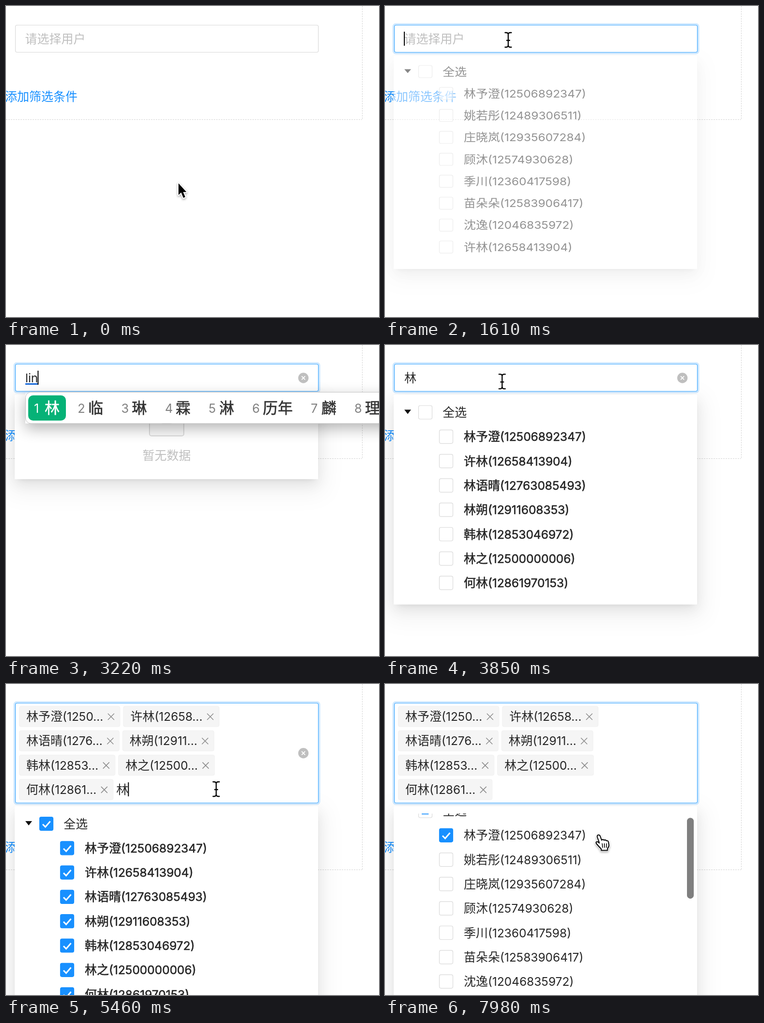
Recreate the animation shown at these times as an HTML page with a canvas. Size 772 px wide and 642 px high, loop 8 s.

```html
<!DOCTYPE html>
<html lang="zh-CN">
<head>
<meta charset="utf-8">
<title>用户筛选</title>
<style>
html, body { margin: 0; width: 100%; height: 100%; overflow: hidden; background: #fff; }
canvas { display: block; width: 772px; height: 642px; }
</style>
</head>
<body>
<canvas id="stage" width="772" height="642"></canvas>
<script>
const ctx = document.getElementById('stage').getContext('2d');
const LOOP = 8000, STEP = 70;
const BLUE = '#1890ff', INK = '#262626', LINE = '#d9d9d9', PALE = '#bfbfbf';
const LEFT = 19, WIDTH = 628, TOP = 39, ROW = 50.3;

const all = [
  '林予澄(12506892347)', '姚若彤(12489306511)', '庄晓岚(12935607284)',
  '顾沐(12574930628)', '季川(12360417598)', '苗朵朵(12583906417)',
  '沈逸(12046835972)', '许林(12658413904)', '韩林(12853046972)'
];
const found = [
  all[0], all[7], '林语晴(12763085493)', '林朔(12911608353)',
  all[8], '林之(12500000006)', '何林(12861970153)'
];
const candidates = {
  l: ['了', '来', '里', '老', '两', '路', '啦', '类'],
  li: ['里', '力', '离', '利', '理', '立', '例', '丽'],
  lin: ['林', '临', '琳', '霖', '淋', '历年', '麟', '理']
};
const caretTimes = [[1120, 1960], [2450, 3850], [4340, 4830], [5320, 5880], [6440, 7420]];
const mouseKeys = [
  [0, 357, 366], [420, 262, 18], [630, 250, 52], [840, 250, 52], [980, 255, 70],
  [3710, 255, 70], [4550, 85, 143], [4900, 85, 143], [5390, 435, 217],
  [5950, 435, 217], [6090, 425, 217], [6860, 425, 217], [7560, 445, 314]
];

const clamp = v => Math.max(0, Math.min(1, v));
const ramp = (t, a, b) => clamp((t - a) / (b - a));
const within = (t, a, b) => t >= a && t < b;

function mouseAt(t) {
  const i = mouseKeys.findIndex(k => k[0] > t);
  if (i < 0) return mouseKeys.at(-1).slice(1);
  const [t0, x0, y0] = mouseKeys[i - 1], [t1, x1, y1] = mouseKeys[i];
  const p = ramp(t, t0, t1), e = p * p * (3 - 2 * p);
  return [x0 + (x1 - x0) * e, y0 + (y1 - y0) * e];
}

// Draws mixed text on its vertical centre and returns its right end.
function text(s, x, mid, color = INK, { size = 25, bold = false, draw = true } = {}) {
  ctx.fillStyle = ctx.strokeStyle = color;
  ctx.lineWidth = 0.6;
  for (const run of s.match(/[ -~]+|[^ -~]+/g) || []) {
    const latin = run < '\x7f';
    ctx.font = latin ? `${size * 0.98}px Inter, sans-serif`
                     : `${size}px "Noto Sans CJK SC", "Noto Sans CJK", sans-serif`;
    if (draw) {
      ctx.fillText(run, x, mid + size * 0.36);
      if (bold) ctx.strokeText(run, x, mid + size * 0.36);
    }
    x += ctx.measureText(run).width;
  }
  return x;
}

function box(x, y, w, h, r, fill, stroke, lineWidth = 1.2) {
  ctx.beginPath();
  ctx.roundRect(x, y, w, h, r);
  if (fill) { ctx.fillStyle = fill; ctx.fill(); }
  if (stroke) { ctx.strokeStyle = stroke; ctx.lineWidth = lineWidth; ctx.stroke(); }
}

// Casts only the shadow around the box; the box itself stays off stage.
function shadow(x, y, w, h, dy, blur, spread, alpha) {
  ctx.save();
  ctx.beginPath();
  ctx.rect(-100, -100, 1000, 1000);
  ctx.rect(x, y, w, h);
  ctx.clip('evenodd');
  ctx.shadowColor = `rgba(0,0,0,${alpha})`;
  ctx.shadowBlur = blur;
  ctx.shadowOffsetX = 2000;
  ctx.shadowOffsetY = dy;
  box(x - 2000 - spread, y - spread, w + 2 * spread, h + 2 * spread, 4, '#000');
  ctx.restore();
}

function lines(color, width, ...paths) {
  ctx.strokeStyle = color;
  ctx.lineWidth = width;
  ctx.beginPath();
  for (const [x, y, ...rest] of paths) {
    ctx.moveTo(x, y);
    for (let i = 0; i < rest.length; i += 2) ctx.lineTo(rest[i], rest[i + 1]);
  }
  ctx.stroke();
}

const cross = (x, y, r, color, w) =>
  lines(color, w, [x - r, y - r, x + r, y + r], [x - r, y + r, x + r, y - r]);

function page(bottom) {
  const edge = Math.floor(bottom + 138) + .5;
  ctx.setLineDash([3, 2]);
  lines('#d4d4d4', 1, [737.5, 0, 737.5, edge], [0, edge, 737, edge]);
  ctx.setLineDash([]);
  text('添加筛选条件', -2, bottom + 91, BLUE);
}

function checkbox(x, mid, state, hover) {
  const on = state === 'on', y = mid - 14;
  box(x + .5, y, 28, 28, 3.5, on ? BLUE : '#fff', on || hover ? BLUE : LINE);
  if (on) lines('#fff', 3, [x + 7, mid + 1, x + 12.5, mid + 6.5, x + 22.5, mid - 5]);
  if (state === 'some') box(x + 7, mid - 7, 14.3, 14.3, 0, BLUE);
}

function list(t, top, rows, height) {
  const searching = rows === found, ticked = t >= 4760;
  const scroll = t >= 7980 ? 26.5 : 20 * ramp(t, 7560, 7770);
  ctx.save();
  ctx.beginPath();
  ctx.rect(18, top, WIDTH, height);
  ctx.clip();
  let mid = top + 21 - scroll;
  ctx.fillStyle = '#111';
  ctx.beginPath();
  ctx.moveTo(40, mid - 5.5);
  ctx.lineTo(54, mid - 5.5);
  ctx.lineTo(47, mid + 3.5);
  ctx.fill();
  checkbox(69, mid, ticked ? (searching ? 'on' : 'some') : '', within(t, 4620, 4760));
  text('全选', 119.3, mid);
  for (const name of rows) {
    mid += ROW;
    checkbox(112, mid, ticked && found.includes(name) ? 'on' : '');
    text(name, 163, mid, INK, { bold: searching });
  }
  ctx.restore();
  if (t >= 7630) box(625, top - 1 + scroll * 0.365, 14, 167, 7, '#7f7f7f');
}

function emptyNote() {
  box(297, 148, 71, 39.5, 4, '#fafafa', LINE, 1.8);
  lines(LINE, 1.8, [297, 150, 312, 122, 353, 122, 368, 150]);
  box(319, 148, 27, 14, 6, '#fff', LINE, 1.8);
  text('暂无数据', 282.5, 228, PALE);
}

function dropdown(t, bottom, typed) {
  const open = ramp(t, 1470, 1750);
  if (!open) return;
  const rows = within(t, 3290, 6790) ? found : all;
  const listHeight = Math.min(458.5, (rows.length + 1) * ROW);
  const y = bottom + 7, h = typed ? 174 : listHeight + 30;
  ctx.save();
  ctx.globalAlpha = open;
  ctx.translate(0, y);
  ctx.scale(1, 0.8 + 0.2 * open);
  ctx.translate(0, -y);
  shadow(18, y, WIDTH, h, 16, 50, 14, .05);
  shadow(18, y, WIDTH, h, 10.7, 28, 0, .08);
  shadow(18, y, WIDTH, h, 5.4, 10.7, -7, .12);
  box(18, y, WIDTH, h, 3.5, '#fff');
  if (typed) emptyNote();
  else list(t, y + 15, rows, listHeight);
  ctx.restore();
}

// Lays out the chosen users and returns where typing continues.
function tags() {
  let x = 27, mid = 67;
  found.forEach((name, i) => {
    if (i && i % 2 === 0) { x = 27; mid += ROW; }
    const label = name.slice(0, 8) + '...';
    const end = text(label, x + 15, mid, INK, { draw: false });
    box(x + .5, mid - 21, end + 34 - x, 42, 3.5, '#f5f5f5', '#f0f0f0', 1);
    text(label, x + 15, mid);
    cross(end + 16, mid + .5, 6.5, '#8c8c8c', 1.5);
    x = end + 41;
  });
  return [x, mid];
}

function field(t, bottom, typed, hover) {
  const focus = ramp(t, 1050, 1260), h = Math.round(bottom) - TOP;
  if (focus) box(LEFT - 1.5, TOP - 1.5, WIDTH + 3, h + 3, 5, null, `rgba(24,144,255,${.2 * focus})`, 4);
  box(LEFT + .5, TOP + .5, WIDTH - 1, h - 1, 3.5, '#fff', hover || focus ? '#40a9ff' : LINE);

  const chosen = t >= 4830;
  const [x, mid] = chosen ? tags() : [40, 68];
  const value = typed || (within(t, 3290, 6790) ? '林' : '');
  if (!value && !chosen) text('请选择用户', 39.5, 67.5, PALE);
  const end = text(value, x, mid);
  if (typed) box(x, 79, end - x, 3, 0, '#1668d9');
  if (caretTimes.some(([a, b]) => within(t, a, b))) box(end - 1, mid - 15, 2, 29, 0, '#000');

  if (hover && (value || chosen)) {
    const cy = (TOP + bottom) / 2 + .5;
    box(604.8, cy - 10.7, 21.4, 21.4, 11, PALE);
    cross(615.5, cy, 3.6, '#fff', 1.8);
  }
}

function inputMethod(typed) {
  if (!typed) return;
  shadow(40, 98, 800, 64, 10, 30, 0, .3);
  box(40.5, 97.5, 800, 64.5, 11, '#fff', '#c4c4c4', 1);
  box(46, 104, 78, 52, 10, '#06b277');
  let x = 58;
  candidates[typed].forEach((word, i) => {
    text(String(i + 1), x, 131, i ? '#808080' : '#fff', { size: 26 });
    text(word, x + 22, 130, i ? '#333' : '#fff', { size: 31, bold: true });
    x += 59.3 + 31 * word.length;
  });
}

const arrow = new Path2D('M0 0V24L5.5 19L10 30L14 28.3L9.6 18H16.5Z');
const beam = new Path2D('M-6.5-15H-4Q0-15 0-11V10Q0 15-4 15H-6.5M6.5-15H4Q0-15 0-11M0 10Q0 15 4 15H6.5M-3 1H3');
const hand = new Path2D('M-1 12L-4 4Q-5-1-1.5-1Q1-1 2 2L5 10Q7 7 10 10Q12 8 14.5 11Q18 10 19 14L20 20Q20 24 17 27V31H4V28Q-1 23-6 17Q-8 13-4.5 13Q-2 13 0 16Z');
const creases = new Path2D('M6 17L7 25M10.5 17L11 25M15 17V25');

function cursor(x, y, kind) {
  ctx.save();
  ctx.translate(x, y);
  ctx.lineJoin = ctx.lineCap = 'round';
  ctx.shadowColor = 'rgba(0,0,0,.35)';
  ctx.shadowBlur = 4;
  ctx.shadowOffsetY = 2;
  const stroke = (path, color, width) => {
    ctx.strokeStyle = color;
    ctx.lineWidth = width;
    ctx.stroke(path);
    ctx.shadowColor = 'transparent';
  };
  if (kind === 'beam') {
    ctx.shadowColor = 'transparent';
    stroke(beam, '#fff', 5);
    stroke(beam, '#000', 2.3);
  } else if (kind === 'hand') {
    ctx.translate(-1.5, -1.5);
    stroke(hand, '#fff', 4);
    ctx.fillStyle = '#fff';
    ctx.fill(hand);
    stroke(hand, '#000', 2);
    stroke(creases, '#000', 1.6);
  } else {
    stroke(arrow, '#fff', 4);
    ctx.fillStyle = '#000';
    ctx.fill(arrow);
  }
  ctx.restore();
}

function draw(t) {
  const bottom = t >= 4830 ? 245.5 : 96;
  const typed = !within(t, 2590, 3290) ? '' : t < 2800 ? 'l' : t < 3010 ? 'li' : 'lin';
  const [mx, my] = mouseAt(t);
  const overField = mx > LEFT && mx < LEFT + WIDTH && my > TOP && my < bottom;
  const overRow = t >= 1540 && my > bottom + 22 && mx > 68 && mx < WIDTH;

  ctx.fillStyle = '#fff';
  ctx.fillRect(0, 0, 772, 642);
  page(bottom);
  dropdown(t, bottom, typed);
  field(t, bottom, typed, overField);
  inputMethod(typed);
  if (!within(t, 2590, 3780) && !within(t, 6790, 6930))
    cursor(mx, my, overField ? 'beam' : overRow ? 'hand' : 'arrow');
}

const start = performance.now();
function frame() {
  const t = (performance.now() - start) % LOOP;
  draw(Math.floor(t / STEP) * STEP);
  requestAnimationFrame(frame);
}
frame();
</script>
</body>
</html>
```
